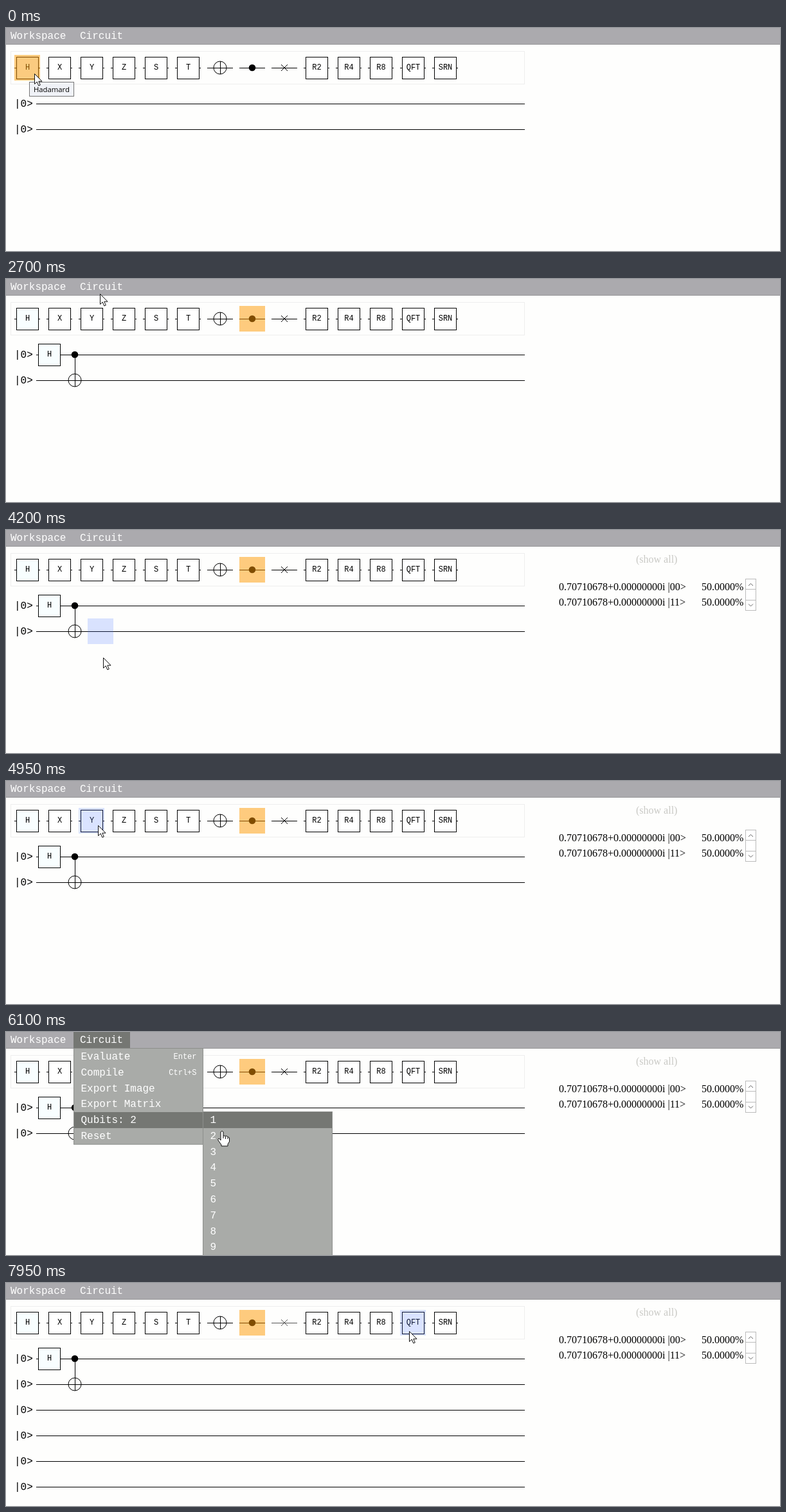
An HTML page that plays this animation: 1204 by 348 pixels, repeating every 8 s.

```html
<!DOCTYPE html>
<html lang="en">
<head>
<meta charset="utf-8">
<title>Quantum circuit editor</title>
<style>
html, body { margin: 0; width: 100%; height: 100%; overflow: hidden; background: #fefefd; }
svg { display: block; }
text { white-space: pre; }
.mono { font: 16px "Courier New", "Liberation Mono", monospace; }
.small { font: 12px "Courier New", "Liberation Mono", monospace; }
.serif { font: 16px "Times New Roman", "Liberation Serif", serif; }
.tip { font: 11.3px "Open Sans", sans-serif; }
</style>
</head>
<body>
<svg id="stage" width="1204" height="348"></svg>
<script>
const LOOP = 8000, STEP = 50;
const GATES = ['H', 'X', 'Y', 'Z', 'S', 'T', 'not', 'dot', 'swap', 'R2', 'R4', 'R8', 'QFT', 'SRN'];
const ITEMS = ['Evaluate', 'Compile', 'Export Image', 'Export Matrix', 'Qubits: ', 'Reset'];
const KEYS = { Evaluate: 'Enter', Compile: 'Ctrl+S' };
const ROW = 24.8, MENU_X = 105, SUB_X = 306, SUB_Y = 124;

// Pointer stops: arrival time, x, y, optional departure time
const PATH = [
  [0, 44, 71], [250, 70, 113, 500], [700, 80, 64, 800], [1100, 117, 149, 1250],
  [1550, 396, 64, 1650], [1850, 117, 131, 1950], [2050, 115, 131, 2150],
  [2350, 113, 152, 2450], [2650, 143, 36], [2700, 146, 23], [2750, 149, 13, 2900],
  [3150, 158, 61, 3250], [3400, 158, 70], [3550, 158, 50], [3750, 156, 44, 3900],
  [4300, 150, 228, 4700], [4900, 143, 79], [4950, 143, 69], [5050, 147, 20],
  [5150, 148, 18, 5250], [5700, 160, 138], [6050, 331, 147], [6100, 336, 154],
  [6650, 334, 268, 7000], [7150, 290, 250], [7350, 140, 238], [7500, 232, 232],
  [7600, 230, 195], [7750, 433, 62], [7800, 565, 80], [7900, 617, 77], [7950, 627, 75]
];

function pointer(t) {
  const i = PATH.findLastIndex(stop => stop[0] <= t);
  const [arrive, x, y, leave = arrive] = PATH[i];
  const [t1, x1, y1] = PATH[i + 1] || [LOOP, x, y];
  const u = Math.max(0, (t - leave) / (t1 - leave)), e = u * u * (3 - 2 * u);
  return [Math.round(x + (x1 - x) * e), Math.round(y + (y1 - y) * e)];
}

const rect = (x, y, w, h, fill, more = '') =>
  `<rect x="${x}" y="${y}" width="${w}" height="${h}" fill="${fill}" ${more}/>`;
const frame = (x, y, w, h, fill, stroke) =>
  rect(x + .5, y + .5, w - 1, h - 1, fill, `stroke="${stroke}"`);
const path = (d, stroke = '#000', fill = 'none') =>
  `<path d="${d}" fill="${fill}" stroke="${stroke}"/>`;
const text = (x, y, s, cls = 'mono', fill = '#000', anchor = 'start') =>
  `<text x="${x}" y="${y}" class="${cls}" fill="${fill}" text-anchor="${anchor}">${s.replace(/>/g, '&gt;')}</text>`;
const wire = (x0, x1, y, color = '#000') => rect(x0, y, x1 - x0, 1, color);
const cell = (x, y, color) => rect(x, y, 40, 40, color);

const HOVER = 'rgba(69,118,255,.2)', PICKED = 'rgba(255,153,0,.5)';

const menuOpen = t => t >= 2750 && t < 3950 || t >= 5100 && t < 7200;
const qubits = t => t < 6850 ? 2 : 6;

// A gate centred on pixel (x, y)
function gate(name, x, y, color = '#000') {
  if (name === 'dot') return `<circle cx="${x}" cy="${y}" r="5.3"/>`;
  if (name === 'not') return `<circle cx="${x}" cy="${y}" r="10" fill="none" stroke="#000"/>` +
    rect(x, y - 10, 1, 20, '#000');
  if (name === 'swap') return path(`M${x - 5} ${y - 5}l10 10m0-10l-10 10`, color);
  const fill = name === 'H' ? '#f8feff' : '#fff';
  return frame(x - 17, y - 17, 35, 35, fill, '#000') + text(x + .5, y + 3, name, 'small', '#000', 'middle');
}

function toolbox(t, [x, y]) {
  const picked = t < 850 ? 0 : t < 1700 ? 1 : 7;
  let out = frame(7, 36, 800, 52, 'none', '#eee');
  GATES.forEach((name, i) => {
    const left = 13 + 50 * i;
    const color = name === 'swap' && t >= 7800 ? '#555' : '#000';
    out += wire(left, left + 40, 62, color) + gate(name, left + 20, 62, color);
    const over = x >= left && x < left + 40 && y >= 42 && y < 82;
    if (i === picked) out += cell(left, 42, PICKED);
    else if (over && !menuOpen(t)) out += cell(left, 42, HOVER);
  });
  return out;
}

function circuit(t, [x, y]) {
  const rows = qubits(t);
  let out = '';
  for (let r = 0; r < rows; r++) out += text(13, 123 + 40 * r, '|0>') + wire(47, 807, 118 + 40 * r);
  if (t >= 550) out += gate('H', 67, 118);
  if (t >= 2300) out += rect(107, 118, 1, 40, '#000') + gate('dot', 107, 118) + gate('not', 107, 158);
  else if (t >= 1300) out += gate('X', 107, 158);
  const col = Math.floor((x - 47) / 40), row = Math.floor((y - 98) / 40);
  if (col >= 0 && col < 19 && row >= 0 && row < rows && !menuOpen(t))
    out += cell(47 + 40 * col, 98 + 40 * row, HOVER);
  return out;
}

function results() {
  let out = text(980, 51, '(show all)', 'serif', '#c9c9c5');
  ['00', '11'].forEach((s, i) => {
    const y = 94 + 24 * i;
    out += text(860, y, `0.70710678+0.00000000i |${s}>`, 'serif') + text(1082, y, '50.0000%', 'serif');
  });
  return out + frame(1150, 76, 17, 50, '#fff', '#bbb') +
    frame(1150, 76, 17, 17, '#fff', '#bbb') + frame(1150, 109, 17, 17, '#fff', '#bbb') +
    path('M1155 87l3.5-3.5 3.5 3.5M1155 115.5l3.5 3.5 3.5-3.5', '#666');
}

function list(x, y, items, lit) {
  let out = frame(x, y, 202, items.length * ROW + 2, '#a9aba8', '#8d8f8c');
  items.forEach((s, i) => {
    const top = Math.round(y + 1 + i * ROW), base = Math.round(y + 18 + i * ROW);
    if (i === lit) out += rect(x + 1, top, 200, 25, s === 'Evaluate' ? '#78767b' : '#757773');
    out += text(x + 11.5, base, s, 'mono', '#fff');
    if (KEYS[s]) out += text(x + 191.5, base - 1, KEYS[s], 'small', '#fff', 'end');
  });
  return out;
}

function menu(t, [x, y]) {
  const inSub = x > SUB_X;
  const row = Math.floor((y - (inSub ? SUB_Y : 25) - 1) / ROW);
  const items = ITEMS.map(s => s.endsWith(' ') ? s + qubits(t) : s);
  const subOpen = t > 5100 && (inSub || row >= 4);
  let out = list(MENU_X, 25, items, subOpen ? 4 : row);
  if (subOpen) out += list(SUB_X, SUB_Y, [...'123456789', '10'], inSub ? row : -1);
  return out;
}

function bar(t) {
  return rect(0, 0, 1204, 25, '#abaaae') + rect(0, 25, 1204, 1, '#979699') +
    (menuOpen(t) ? rect(MENU_X, 0, 88, 25, '#757773') : '') +
    text(7, 17, 'Workspace', 'mono', '#fff') + text(115, 17, 'Circuit', 'mono', '#fff');
}

function cursor(t, [x, y]) {
  const arrow = 'M.5 .5V16.5L4.2 13 6.8 19 9.3 18 6.8 12.2H12Z';
  const hand = 'M-2 15V2Q0-1 2 2V8Q7 7 11.5 11V17L9 21V24H-1V22L-6 15Q-6.5 11.5-4 12.5ZM2 8v4m3.5-3v4m3.5-3v3';
  return `<g transform="translate(${x} ${y})">${path(menuOpen(t) ? hand : arrow, '#111', '#fff')}</g>`;
}

function draw(t) {
  const over = pointer(Math.max(0, t - STEP)); // hover trails the pointer by one step
  let out = rect(0, 0, 1204, 348, '#fefefd') + bar(t) + toolbox(t, over) + circuit(t, over);
  if (t >= 4000) out += results();
  if (menuOpen(t)) out += menu(t, over);
  if (t < 50) out += frame(36, 84, 70, 23, '#f0f2f7', '#767676') + text(43, 100, 'Hadamard', 'tip');
  return out + cursor(t, pointer(t));
}

const stage = document.getElementById('stage'), start = performance.now();
let shown = -1;
function tick() {
  const t = Math.floor((performance.now() - start) % LOOP / STEP) * STEP;
  if (t !== shown) stage.innerHTML = draw(shown = t);
  requestAnimationFrame(tick);
}
tick();
</script>
</body>
</html>
```
